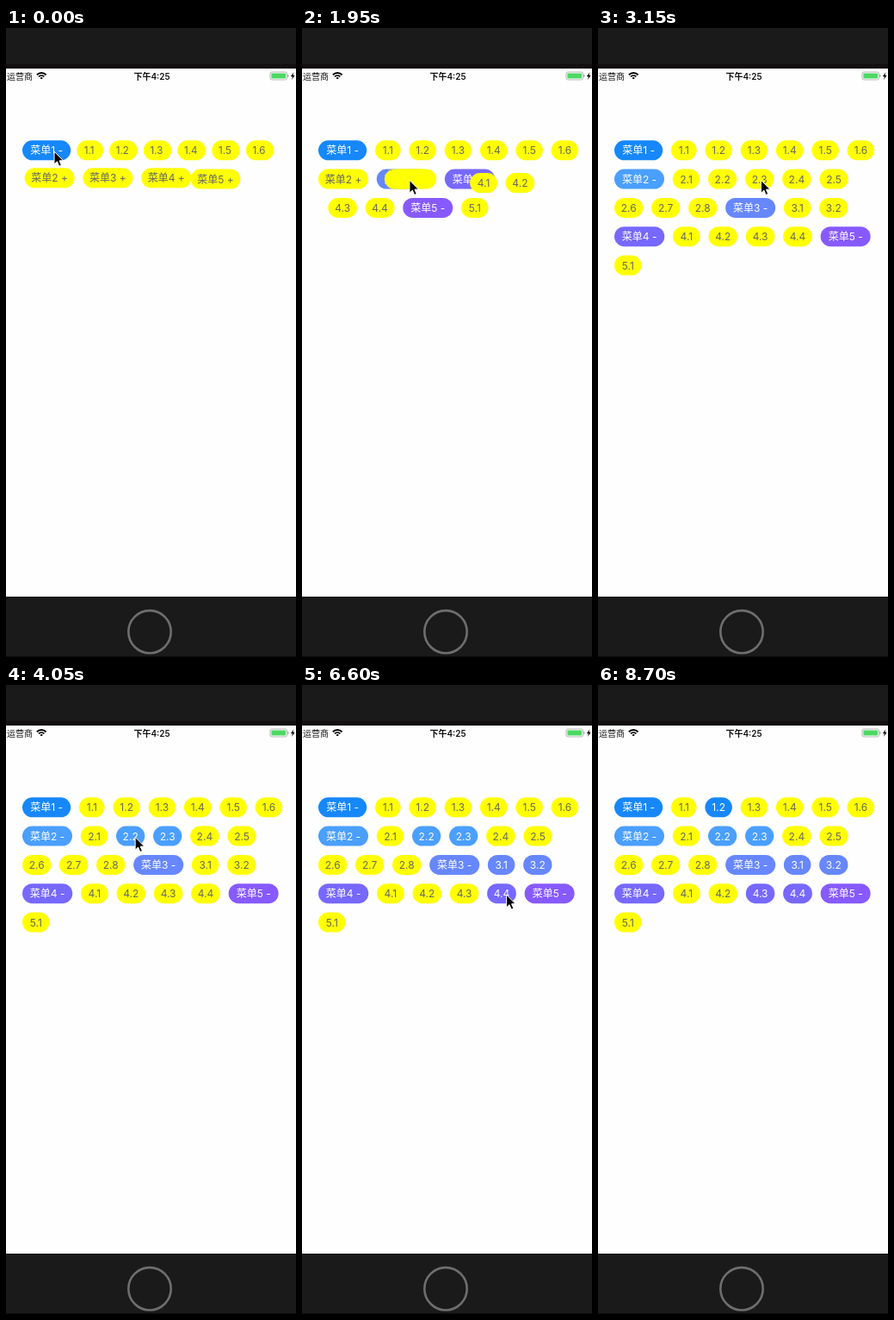
Animation of 337 by 729 pixels, one loop 9 s. Source, as an HTML page with a canvas:

```html
<!DOCTYPE html>
<html lang="zh-CN">
<head>
<meta charset="utf-8">
<title>Expanding tag menu</title>
<style>
  html, body { margin: 0; width: 100%; height: 100%; overflow: hidden; background: #1a1a1a; }
  canvas { display: block; width: 337px; height: 729px; }
</style>
</head>
<body>
<canvas id="stage"></canvas>
<script>
const W = 337, H = 729, LOOP = 9000, STEP = 150, OPEN_MS = 300;
const LEFT = 19, RIGHT = 323, TOP = 130.3, GAP = 9.75, PITCH = 33.3, PILL_H = 23;
const FONT = 'Inter, "Noto Sans CJK SC", "Noto Sans CJK", sans-serif';
const YELLOW = '#ffff00';
const canvas = document.getElementById('stage');
const ctx = canvas.getContext('2d');
const dpr = window.devicePixelRatio || 1;
canvas.width = W * dpr;
canvas.height = H * dpr;

const mix = (a, b, p) => a + (b - a) * p;
const smooth = p => p * p * (3 - 2 * p);
const progress = (t, start, end) => smooth(Math.max(0, Math.min(1, (t - start) / (end - start))));

// Proportional digits: 1 is narrow, 4 is a little wide.
const tagWidth = (base, id) => [...id].reduce(
  (w, c) => w + (c === '1' ? -1.8 : c === '4' ? 0.25 : 0), base);

const makeMenu = (id, count, color) => ({
  id, color,
  width: tagWidth(58, id),
  children: Array.from({ length: count }, (_, i) => {
    const childId = `${id}.${i + 1}`;
    return { id: childId, width: tagWidth(33.3, childId) };
  })
});
const menus = [
  makeMenu('1', 6, '#1688fb'),
  makeMenu('2', 8, '#4a9fff'),
  makeMenu('3', 2, '#6687ff'),
  makeMenu('4', 4, '#7768ff'),
  makeMenu('5', 1, '#875aff')
];
const menuById = id => menus.find(m => m.id === id);

// A tap on a menu opens it, a tap on a child toggles it; a point only moves the pointer.
const taps = [
  [-264, '1'], [873, '5'], [1260, '4'], [1881, '3'], [2760, '2'],
  [3450, '2.3'], [3900, '2.2'], [4650, '2.4'], [4950, '2.4'],
  [5550, '3.1'], [6150, '3.2'], [6600, '4.4'], [6900, '4.3'], [7350, '1.2'],
  [8150, { x: 227, y: 672 }], [LOOP, { x: 280, y: 750 }]
].map(([at, target]) => ({ at, target }));
const openings = taps.filter(tap => menuById(tap.target));

function layout(openIds) {
  const frames = {};
  let x = LEFT, y = TOP;
  const place = ({ id, width }) => {
    if (x + width > RIGHT) { x = LEFT; y += PITCH; }
    frames[id] = { x, y, w: width };
    x += width + GAP;
  };
  for (const menu of menus) {
    place(menu);
    if (openIds.includes(menu.id)) menu.children.forEach(place);
  }
  return frames;
}

const layouts = Array.from({ length: openings.length + 1 },
  (_, n) => layout(openings.slice(0, n).map(o => o.target)));

function text(str, x, y, size, color, align = 'center', weight = 400) {
  ctx.font = `${weight} ${size}px ${FONT}`;
  ctx.textAlign = align;
  ctx.fillStyle = color;
  ctx.fillText(str, x, y);
}

function rect(x, y, w, h, color, radius = 0) {
  ctx.fillStyle = color;
  ctx.beginPath();
  ctx.roundRect(x, y, w, h, radius);
  ctx.fill();
}

function polygon(points, color) {
  ctx.beginPath();
  points.forEach(([x, y]) => ctx.lineTo(x, y));
  ctx.closePath();
  ctx.fillStyle = color;
  ctx.fill();
}

function arc(x, y, r, from, to, color, width) {
  ctx.beginPath();
  ctx.arc(x, y, r, from, to);
  ctx.strokeStyle = color;
  ctx.lineWidth = width;
  ctx.stroke();
}

function pill({ x, y, w }, label, activeColor, labelScale = 1, labelWidth = w) {
  rect(x, y, w, PILL_H, activeColor || YELLOW, PILL_H / 2);
  ctx.save();
  ctx.translate(x, y);
  ctx.scale(labelScale, labelScale);
  text(label, labelWidth / 2, 16, 12, activeColor ? '#fff' : '#666');
  ctx.restore();
}

function drawTags(t) {
  const opened = openings.filter(o => o.at <= t);
  const newest = opened[opened.length - 1];
  const p = progress(t, newest.at, newest.at + OPEN_MS);
  const from = layouts[opened.length - 1], to = layouts[opened.length];
  // New children grow out of their menu's pill.
  const frameOf = (id, parentId) => {
    const a = from[id] || from[parentId], b = to[id];
    return { x: mix(a.x, b.x, p), y: mix(a.y, b.y, p), w: mix(a.w, b.w, p) };
  };
  const isSelected = id => taps.filter(tap => tap.target === id && tap.at <= t).length % 2 === 1;

  for (const { id, color } of menus) {
    const open = isSelected(id);
    pill(frameOf(id), `菜单${id} ${open ? '-' : '+'}`, open && color);
  }
  for (const opening of opened) {
    const menu = menuById(opening.target);
    for (const { id, width } of menu.children) {
      pill(frameOf(id, menu.id), id, isSelected(id) && menu.color, opening === newest ? p : 1, width);
    }
  }
}

function pointerSpot({ at, target }) {
  if (typeof target === 'object') return target;
  const { x, y, w } = layouts[openings.filter(o => o.at < at).length][target];
  return { x: x + w * 0.65, y: y + PILL_H * 0.55 };
}

function drawPointer(t) {
  const i = taps.findIndex(tap => tap.at > t);
  const last = taps[i - 1], next = taps[i];
  const a = pointerSpot(last), b = pointerSpot(next);
  // Rest after a tap, travel, then rest again before the next one.
  const p = progress(t, mix(last.at, next.at, 0.25), mix(last.at, next.at, 0.6));
  ctx.save();
  ctx.translate(mix(a.x, b.x, p), mix(a.y, b.y, p));
  polygon([[0.5, 0.2], [0.5, 15], [3.9, 11.8], [6.2, 17.2], [8.8, 16.1], [6.5, 10.9], [11, 10.7]], '#000');
  ctx.strokeStyle = '#fff';
  ctx.lineWidth = 1;
  ctx.stroke();
  ctx.restore();
}

function drawStatusBar() {
  text('运营商', 1, 59.5, 10, '#111', 'left');
  text('下午4:25', 169.5, 59.5, 10, '#111', 'center', 600);
  for (const r of [1.4, 4.5, 7.6]) {
    arc(41.2, 59.6, r, -Math.PI * 0.75, -Math.PI * 0.25, '#000', 1.9);
  }
  ctx.beginPath();
  ctx.roundRect(307, 51, 19.6, 9, 2);
  ctx.strokeStyle = '#a5a5a5';
  ctx.lineWidth = 0.8;
  ctx.stroke();
  rect(308.4, 52.4, 16.8, 6.2, '#4cd964', 0.8);
  rect(327.3, 54, 1.2, 3, '#a5a5a5', 0.6);
  polygon([[334.3, 51.2], [330.8, 56.2], [333, 56.2], [332, 60], [335.7, 54.8], [333.4, 54.8]], '#000');
}

function drawDevice() {
  rect(0, 0, W, H, '#1a1a1a');
  rect(0, 41.7, W, 5.3, '#130f10');
  rect(0, 47, W, 612, '#fefefe');
  rect(0, 728, W, 1, '#0c0c0c');
  arc(167, 699.8, 24.7, 0, Math.PI * 2, '#6e6e6e', 2.6);
}

const startTime = performance.now();

function render() {
  const elapsed = (performance.now() - startTime) % LOOP;
  const t = Math.floor(elapsed / STEP) * STEP;
  ctx.setTransform(dpr, 0, 0, dpr, 0, 0);
  drawDevice();
  drawStatusBar();
  drawTags(t);
  drawPointer(t);
  requestAnimationFrame(render);
}
render();
</script>
</body>
</html>
```
